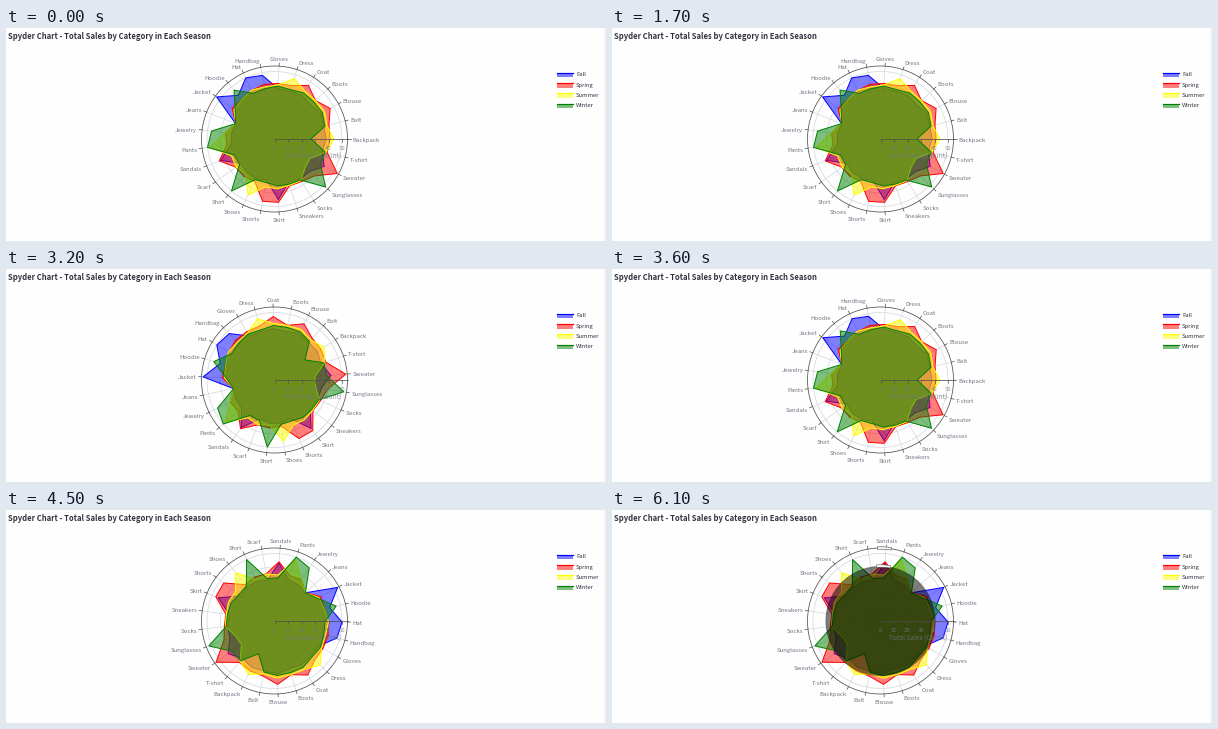
These frames come from a looping animation (600 px wide and 213 px high, 6.2 s). A matplotlib script:

```python
import numpy as np
import matplotlib.pyplot as plt
from matplotlib.animation import FuncAnimation
from matplotlib.patches import Circle, Polygon, Rectangle

W, H, DPI = 600, 213, 100
PX = 72 / DPI                     # points per pixel
FRAMES, STEP = 62, 100
CX, CY, R = 268.5, 111, 73        # dial centre and radius
UNIT = 1.35                       # pixels per sale
FONT = "Noto Sans CJK JP"
INK, GREY, EDGE = "#31333f", "#747684", "#4c4c4c"

ITEMS = ("Backpack Belt Blouse Boots Coat Dress Gloves Handbag Hat Hoodie "
         "Jacket Jeans Jewelry Pants Sandals Scarf Shirt Shoes Shorts Skirt "
         "Sneakers Socks Sunglasses Sweater T-shirt").split()
ANGLES = np.arange(len(ITEMS)) * 360 / len(ITEMS)

# season: colour, usual sales, items that stand out
SEASONS = {
    "Fall": ("#0000ff", 34.5, dict(Handbag=48, Hat=50, Hoodie=42, Jacket=53,
                                   Sandals=43, Skirt=45, Sweater=42)),
    "Spring": ("#ff0000", 38.5, dict(Blouse=47, Coat=47, Sandals=44,
                                     Shorts=47, Skirt=47, Sweater=53)),
    "Summer": ("#ffff00", 38, dict(Backpack=44, Dress=47, Pants=48, Shoes=46,
                                   Sunglasses=31, Sweater=30)),
    "Winter": ("#008000", 36.5, dict(Backpack=27, Hoodie=47, Jewelry=47,
                                     Pants=50, Sandals=32, Shirt=50,
                                     Sunglasses=52)),
}

# times in ms, angles in degrees
TURN_START, TURN_BACK, TURN_END = 2800, 3200, 4500
TURN_PEAK, TURN_REST = 33.5, -116
TIP_ON, TIP_OFF = 1800, 2800
ZOOM_START, ZOOM_END = 5400, 6100
ZOOM_ANGLE, ZOOM_R = 87, 55


def ease(t, start, end):
    u = np.clip((t - start) / (end - start), 0, 1)
    return u * u * (3 - 2 * u)


def turn(t):
    """Dial angle: a short drag one way, then a long one back."""
    return (TURN_PEAK * ease(t, TURN_START, TURN_BACK)
            + (TURN_REST - TURN_PEAK) * ease(t, TURN_BACK, TURN_END))


def make_sales(usual, special, rng):
    sales = usual + 3.5 * np.cos(np.radians(ANGLES - 40))
    sales += rng.uniform(-1.2, 1.2, len(ITEMS))
    for item, value in {"Jeans": 31, **special}.items():
        sales[ITEMS.index(item)] = value
    return sales


def polar(r, deg):
    a = np.radians(deg)
    return CX + r * np.cos(a), CY - r * np.sin(a)


fig = plt.figure(figsize=(W / DPI, H / DPI), dpi=DPI, facecolor="#fefefe")
ax = fig.add_axes([0, 0, 1, 1])
ax.set_xlim(0, W)
ax.set_ylim(H, 0)
ax.axis("off")


def label(x, y, text, size=6.05, color=GREY, ha="left", z=8, **kw):
    """Text whose capitals are centred on y."""
    return ax.text(x, y + 0.36 * size, text, fontsize=size * PX, color=color,
                   family=FONT, ha=ha, va="baseline", zorder=z, **kw)


def line(xs, ys, color, width, z):
    return ax.plot(xs, ys, color=color, lw=width * PX, zorder=z)[0]


def shape(points, z, fill, edge="none", width=0.0):
    return ax.add_patch(Polygon(points, closed=True, fc=fill, ec=edge,
                                lw=width * PX, joinstyle="round", zorder=z))


def ring(r, color, width, z):
    ax.add_patch(Circle((CX, CY), r, fc="none", ec=color, lw=width * PX,
                        zorder=z))


def corner(r):
    """Outline of a short curved zoom handle at radius r."""
    half = np.degrees(7 / r)
    sweep = np.linspace(ZOOM_ANGLE - half, ZOOM_ANGLE + half, 12)
    outer = np.column_stack(polar(r + 1.2, sweep))
    inner = np.column_stack(polar(r - 1.2, sweep[::-1]))
    return np.vstack([outer, inner])


# page
label(2, 8.2, "Spyder Chart - Total Sales by Category in Each Season",
      size=7.62, color=INK, weight="bold")
ax.add_patch(Rectangle((597.5, 0), 2.5, H, fc="#f4f4f7", ec="none"))

# legend and areas
rng = np.random.default_rng(4)
areas = []
for i, (name, (color, usual, special)) in enumerate(SEASONS.items()):
    y = 46.2 + 10.3 * i
    ax.add_patch(Rectangle((551, y - 1.6), 16, 4.6, fc=color, alpha=0.5, lw=0))
    line([551, 567], [y - 1.6] * 2, color, 1.2, 3)
    label(570, y, name, size=5.9, color=INK)

    z = 2 + i * 0.5
    fill = shape([(0, 0)] * 3, z, color)
    fill.set_alpha(0.5)
    edge = shape([(0, 0)] * 3, z + 0.1, "none", color, 1.0)
    areas.append((make_sales(usual, special, rng) * UNIT, fill, edge))

# dial
for v in range(10, 51, 10):
    ring(v * UNIT, "#d4d6dc", 0.7, 1)
ring(R, EDGE, 0.75, 7)
spokes = [line([], [], "#d4d6dc", 0.7, 1) for _ in ITEMS]
ticks = [line([], [], EDGE, 0.7, 7) for _ in ITEMS]
names = [label(0, 0, item) for item in ITEMS]

# radial axis
line([CX, CX + R], [CY, CY], EDGE, 0.7, 7)
for v in range(0, 51, 10):
    x = CX + v * UNIT
    line([x, x], [CY, CY + 3], EDGE, 0.6, 7)
    label(x, 120, v, ha="center", alpha=0.75)
label(306, 127.5, "Total Sales (Count)", size=6.6, ha="center", alpha=0.75)

# hover tip
tip = [shape([(302.5, 111.5), (306.5, 108.5), (306.5, 106.5), (328, 106.5),
              (328, 117), (306.5, 117), (306.5, 114.5)], 9, "white",
             "#e8e8e8", 0.5),
       label(317.3, 111.9, "Winter", size=5.3, color="#666666", ha="center",
             z=10)]

# zoom drag
shade = ax.add_patch(Circle((CX, CY), R, fc="black", ec="none", alpha=0.5,
                            zorder=6))
near = shape(corner(R), 9, "white", EDGE, 0.5)
far = shape(corner(R), 9, "white", EDGE, 0.6)


def place_label(text, deg):
    c, s = np.cos(np.radians(deg)), np.sin(np.radians(deg))
    text.set_ha("center" if abs(c) < 0.11 else "left" if c > 0 else "right")
    text.set_position((CX + 78 * c, CY + 2.6 - 80.5 * s))


def draw(n):
    t = n * STEP
    degs = ANGLES + turn(t)
    for deg, spoke, tick, text in zip(degs, spokes, ticks, names):
        spoke.set_data(*polar(np.array([0, R]), deg))
        tick.set_data(*polar(np.array([R, R + 3]), deg))
        place_label(text, deg)
    for radii, fill, edge in areas:
        points = np.column_stack(polar(radii, degs))
        fill.set_xy(points)
        edge.set_xy(points)

    for part in tip:
        part.set_visible(TIP_ON <= t <= TIP_OFF)

    r = R + (ZOOM_R - R) * ease(t, ZOOM_START, ZOOM_END)
    shade.set_radius(r)
    near.set_xy(corner(r))
    for part in (shade, near, far):
        part.set_visible(t > ZOOM_START)
    return []


anim = FuncAnimation(fig, draw, frames=FRAMES, interval=STEP, repeat=True,
                     repeat_delay=0, init_func=lambda: draw(0), blit=False)
plt.show()
```
